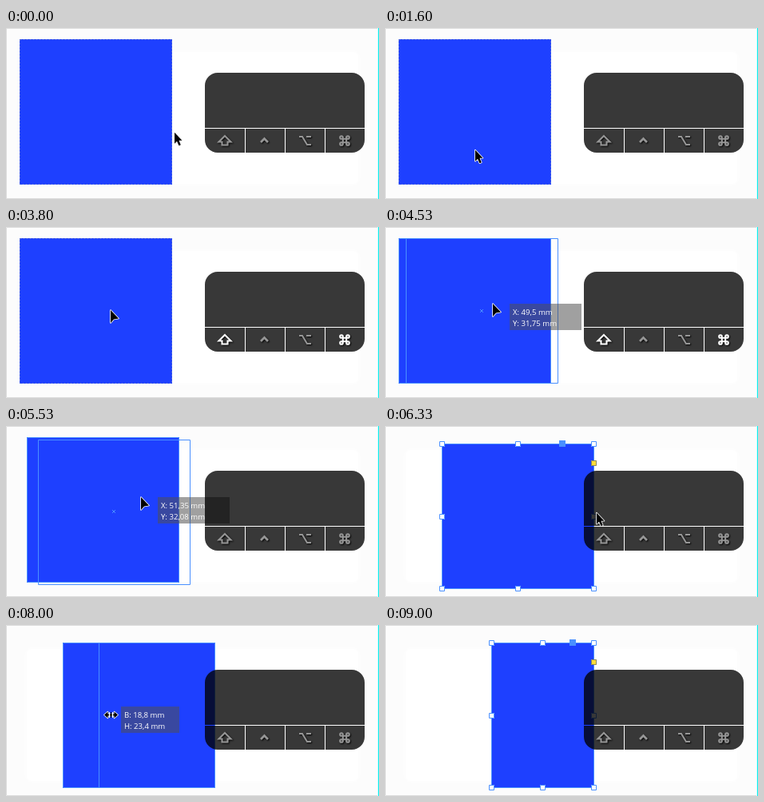
An HTML page with a canvas for the animation above (9.14 s loop, 467 px wide and 214 px high).

```html
<!DOCTYPE html>
<html lang="en">
<head>
<meta charset="utf-8">
<title>Moving and resizing a frame</title>
<style>
html, body { margin: 0; width: 100%; height: 100%; overflow: hidden; background: #fff }
canvas { display: block }
</style>
</head>
<body>
<canvas id="stage" width="467" height="214"></canvas>
<script>
const c = document.getElementById('stage').getContext('2d');
const LOOP = 9140, STEP = 1000 / 15, PX_PER_MM = 7.78, LAG = 49;
const BLUE = '#1e40ff', LINE = '#4a90ff';

// Eased pointer moves: from time, to time, x, y, lift of the arc
const moves = [
  [333, 733, 112, 104], [800, 1067, 144, 66], [1067, 1533, 112, 152],
  [1667, 2333, 101, 104], [2467, 2667, 130, 104], [3733, 4133, 125, 95],
  [4267, 4533, 134, 95], [4733, 5133, 154, 85], [5333, 5867, 199, 93],
  [5933, 6333, 264, 108], [6333, 6800, 266, 112], [6933, 7333, 72, 112, 47],
  [7800, 8033, 134, 112]
];

const ramp = (t, a, b) => Math.max(0, Math.min(1, (t - a) / (b - a)));
const mm = (v, digits) => String(+v.toFixed(digits)).replace('.', ',') + ' mm';

function pointer(t) {
  let x = 210, y = 130;
  for (const [from, to, nx, ny, lift = 0] of moves) {
    const p = ramp(t, from, to), e = p * p * (3 - 2 * p);
    x += (nx - x) * e;
    y += (ny - y) * e - lift * Math.sin(Math.PI * e);
  }
  return [x, y];
}

function box(x, y, w, h, color) {
  c.fillStyle = color;
  c.fillRect(x, y, w, h);
}

function outline(x, y, w, h, color = LINE) {
  c.strokeStyle = color;
  c.lineWidth = 1;
  c.strokeRect(Math.round(x) + .5, Math.round(y) + .5, w, h);
}

function path(points, x = 0, y = 0, close = false) {
  c.beginPath();
  for (let i = 0; i < points.length; i += 2) c.lineTo(x + points[i], y + points[i + 1]);
  if (close) c.closePath();
}

function solid(points, x, y) {
  path(points, x, y, true);
  c.strokeStyle = '#fff';
  c.lineWidth = 1.6;
  c.lineJoin = 'round';
  c.stroke();
  c.fillStyle = '#000';
  c.fill();
}

function background() {
  box(0, 0, 467, 214, '#fcfcfc');
  c.save();
  c.shadowColor = '#fff';
  c.shadowBlur = 8;
  c.fillStyle = '#fff';
  c.beginPath();
  c.roundRect(26, 30, 415, 165, 6);
  c.fill();
  c.restore();
  outline(0, 0, 465, 213, '#dcdcdc');
  box(465, 0, 1, 214, '#c8ffff');
  box(466, 0, 1, 214, '#10ecec');
}

function handles(x, y, w, h) {
  outline(x, y, w, h);
  for (let i = 0; i < 9; i++) {
    if (i === 4) continue;
    const hx = Math.round(x + w * (i % 3) / 2), hy = Math.round(y + h * Math.floor(i / 3) / 2);
    box(hx - 3, hy - 3, 7, 7, '#fff');
    outline(hx - 3, hy - 3, 6, 6);
  }
  box(Math.round(x + w * .795) - 4, y - 4, 8, 8, LINE);
  box(x + w - 3, y + 21, 7, 7, '#ffdc3c');
  outline(x + w - 3, y + 21, 6, 6, '#8a8a60');
}

function tip(x, y, w, lines) {
  x = Math.round(x);
  y = Math.round(y);
  box(x, y, w, 33, 'rgba(80,80,80,.54)');
  c.font = '500 9.6px "Open Sans", sans-serif';
  c.fillStyle = '#fff';
  lines.forEach((s, i) => c.fillText(s, x + 4, y + 14 + i * 14));
}

function cross(x, y) {
  c.strokeStyle = LINE;
  for (const s of [-2, 2]) {
    path([-2, -s, 2, s], Math.round(x), Math.round(y));
    c.stroke();
  }
}

// The frame with its drag outlines and measurements
function frame(t, px, py) {
  const h = 181;
  let x = 17, y = 14, w = 190;
  if (t >= 4600) x = 26;
  if (t >= 5930) { x = 71; y = 22; }
  if (t >= 8400) { x = 133; w = 128; }
  box(x, y, w + 1, h + 1, BLUE);

  const slide = t >= 4330 && t < 4600, move = t >= 5400 && t < 5930;
  if (slide || move) {
    const nx = x + px - (slide ? 125 : 154), ny = y + (slide ? 0 : py - 85);
    outline(x, y, w, h);
    outline(nx, ny, w, h);
    cross(nx + w / 2, ny + h / 2);
    tip(px + 22, py + 1, 90, [
      'X: ' + mm(49.5 + (nx - 26) / PX_PER_MM, 2),
      'Y: ' + mm(31.75 + (ny - 14) / PX_PER_MM, 2)
    ]);
  } else if (t >= 7870 && t < 8400) {
    const left = pointer(t - LAG)[0] - 1;
    outline(x, y, w, h);
    outline(left, y, 261 - Math.round(left), h);
    tip(px + 13, 102, 73, [
      'B: ' + mm((262 - left) / PX_PER_MM, 1),
      'H: ' + mm(182 / PX_PER_MM, 1)
    ]);
  } else if (t >= 4600) {
    handles(x, y, w, h);
  } else {
    c.setLineDash([2, 2]);
    outline(x, y, w, h, '#5a70d8');
    c.setLineDash([]);
  }
}

const glyphs = [
  () => path([0, -6, 7.5, 1.5, 3.5, 1.5, 3.5, 5.5, -3.5, 5.5, -3.5, 1.5, -7.5, 1.5], 274, 141, true),
  () => path([-4.5, 2, 0, -2.5, 4.5, 2], 323.5, 141),
  () => {
    path([-7, -5, -3, -5, 3, 5, 8, 5], 374, 141);
    c.moveTo(376, 136);
    c.lineTo(382, 136);
  },
  () => {
    c.beginPath();
    c.rect(421.8, 138.8, 4.4, 4.4);
    for (const sx of [-1, 1]) for (const sy of [-1, 1]) {
      const x = 424 + sx * 4, y = 141 + sy * 4;
      c.moveTo(x + 1.8, y);
      c.arc(x, y, 1.8, 0, 7);
    }
  }
];

// Dark key panel, with its dividing lines left open
function panel(lit) {
  c.save();
  c.globalCompositeOperation = 'multiply';
  c.fillStyle = '#383838';
  c.beginPath();
  c.roundRect(249, 56, 200, 100, 16);
  c.rect(249, 125, 200, 1);
  for (const x of [299, 349, 399]) c.rect(x, 126, 1, 30);
  c.fill('evenodd');
  c.restore();

  c.save();
  c.lineJoin = 'miter';
  c.shadowColor = '#000';
  c.shadowBlur = 2;
  c.shadowOffsetX = c.shadowOffsetY = 1;
  glyphs.forEach((draw, i) => {
    const v = 150 + 105 * (i % 3 ? 0 : lit);
    c.strokeStyle = `rgb(${v},${v},${v})`;
    c.lineWidth = i === 1 ? 2.8 : 2.1;
    draw();
    c.stroke();
  });
  c.restore();
}

function cursor(t, x, y) {
  if (t >= 8400) return;
  x = Math.round(x);
  y = Math.round(y);
  if (t >= 7530) {
    solid([-8.5, 0, -4, -4, -4, -1, 4, -1, 4, -4, 8.5, 0, 4, 4, 4, 1, -4, 1, -4, 4], x + .5, y + .5);
    for (const dx of [-2, 2]) box(x + dx, y - 3, 1, 7, '#fff');
    box(x, y - 3, 1, 7, '#000');
  } else if (t >= 3000 && t < 5930) {
    solid([0, 0, 0, 16, 4, 11.5, 10, 10.5], x + 1, y + 1);
  } else {
    solid([0, 0, 0, 14, 3, 11, 5.5, 16.5, 7.8, 15.5, 5.5, 10, 9.5, 10], x + 1, y + .7);
  }
}

function draw(t) {
  const [px, py] = pointer(t);
  background();
  frame(t, px, py);
  if (t >= 2330 && t < 2730) box(Math.round(px) - 14, 106, 5, 1, '#d8e0c8');
  panel(ramp(t, 3267, 3400) - ramp(t, 4733, 4867));
  cursor(t, px, py);
}

let start;
function tick(now) {
  start ??= now;
  const t = (now - start) % LOOP;
  draw(Math.floor((t + 5) / STEP) * STEP + 1);
  requestAnimationFrame(tick);
}
requestAnimationFrame(tick);
</script>
</body>
</html>
```
